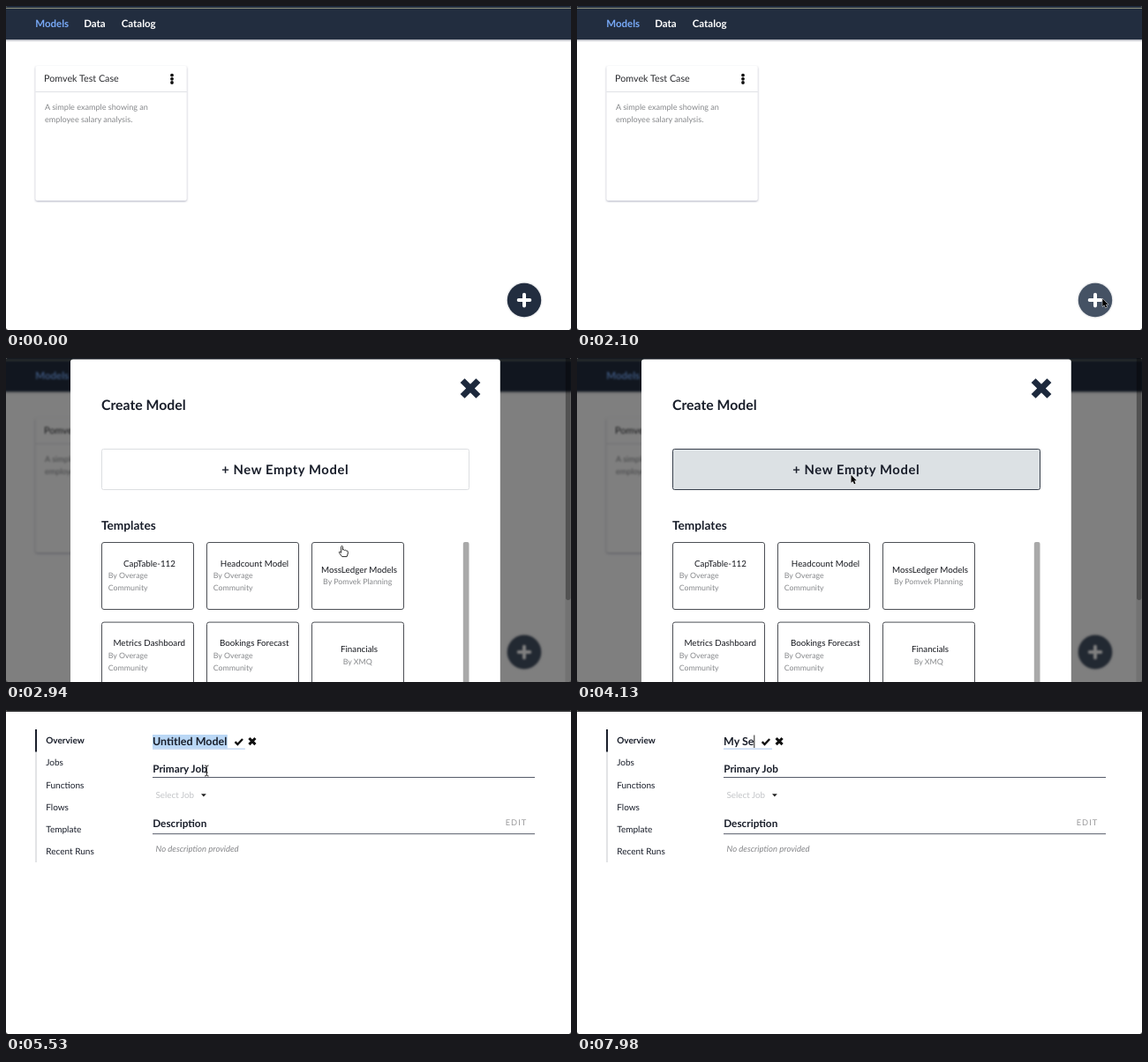
An HTML page that plays this animation: 640x368 px, repeating every 8000 ms.

```html
<!DOCTYPE html>
<html lang="en">
<head>
<meta charset="utf-8">
<title>Create a model</title>
<style>
  html, body { margin: 0; width: 100%; height: 100%; overflow: hidden; background: #fff; }
  svg { display: block; width: 100%; height: 100%; }
  text { font-family: Lato, "Open Sans", sans-serif; white-space: pre; text-rendering: geometricPrecision; }
</style>
</head>
<body>
<svg id="stage" viewBox="0 0 640 368" preserveAspectRatio="none"></svg>
<script>
const NS = "http://www.w3.org/2000/svg";
const LOOP = 8000, TICK = 70;
const NAVY = "#222d3f", INK = "#191e2a", GREY = "#86888b";
const stage = document.getElementById("stage");

// ---------- drawing helpers ----------
function add(parent, tag, attrs = {}, content) {
  const el = document.createElementNS(NS, tag);
  for (const key in attrs) el.setAttribute(key, attrs[key]);
  if (content !== undefined) el.textContent = content;
  parent.appendChild(el);
  return el;
}
const group = (parent, attrs) => add(parent, "g", attrs);
const path = (parent, d, attrs) => add(parent, "path", { d, ...attrs });
const rect = (parent, x, y, width, height, fill, attrs) =>
  add(parent, "rect", { x, y, width, height, fill, ...attrs });
const text = (parent, x, y, size, fill, content, attrs) =>
  add(parent, "text", { x, y, "font-size": size, fill, ...attrs }, content);
const bold = (parent, x, y, size, fill, content, attrs) =>
  text(parent, x, y, size, fill, content, { "font-weight": 700, ...attrs });
const show = (el, on) => el.setAttribute("visibility", on ? "visible" : "hidden");
const move = (el, x, y) => el.setAttribute("transform", `translate(${x} ${y})`);

// ---------- timing helpers ----------
const clamp = v => Math.min(1, Math.max(0, v));
const ramp = (t, from, to) => clamp((t - from) / (to - from));
const smooth = v => v * v * (3 - 2 * v);
const mix = (a, b, k) => a + (b - a) * k;
const blend = (a, b, k) => `rgb(${a.map((v, i) => Math.round(mix(v, b[i], k)))})`;

function along(keys, t) {
  let i = 0;
  while (i < keys.length - 2 && t >= keys[i + 1][0]) i++;
  const [t0, x0, y0] = keys[i], [t1, x1, y1] = keys[i + 1];
  const k = smooth(ramp(t, t0, t1));
  return [mix(x0, x1, k), mix(y0, y1, k)];
}

// ---------- model list ----------
rect(stage, 0, 0, 640, 368, "#fff");
const home = group(stage);
rect(home, -20, -20, 680, 408, "#fff");
const nav = rect(home, -20, -20, 680, 58, NAVY);
nav.style.filter = "drop-shadow(0 1px 1.3px rgba(25,35,60,.5))";
rect(home, -20, 2, 680, 1, "#8f917c");
bold(home, 33.2, 24.3, 11.5, "#78a9f7", "Models");
bold(home, 88.2, 24.3, 11.5, "#fff", "Data");
bold(home, 130.7, 24.3, 11.5, "#fff", "Catalog");

const card = rect(home, 33.3, 68, 171.5, 153, "#fff", { rx: 2 });
card.style.filter = "drop-shadow(0 1.2px .9px rgba(70,75,110,.42))";
rect(home, 33.3, 97, 171.5, 1, "#e0e1e6");
text(home, 43, 86.4, 10.75, "#2b2c30", "Pomvek Test Case");
for (const y of [78.6, 82.8, 87]) add(home, "circle", { cx: 188, cy: y, r: 1.9, fill: "#111" });
text(home, 44, 118.2, 9.1, GREY, "A simple example showing an");
text(home, 44, 131.6, 9.1, GREY, "employee salary analysis.");

const fab = add(home, "circle", { cx: 587, cy: 334, r: 19.2 });
fab.style.filter = "drop-shadow(0 0 1px rgba(30,40,60,.35))";
path(home, "M587 327.8V340.4M580.7 334.1H593.3",
  { stroke: "#fff", "stroke-width": 4, "stroke-linecap": "round" });

// ---------- create dialog ----------
const dialog = group(stage);
rect(dialog, 0, 0, 640, 368, "#000", { opacity: .5 });
rect(dialog, 633.5, 0, 6.5, 368, "#000", { opacity: .1 });
rect(dialog, 634, -6, 5.5, 281, "#000", { rx: 2.7, opacity: .28 });
rect(dialog, 73, 1.4, 486.8, 380, "#fff", { rx: 3 });
bold(dialog, 108, 58.5, 15.8, INK, "Create Model");
path(dialog, "M517.1 25.6L534.9 43.4M534.9 25.6L517.1 43.4", { stroke: "#1c283c", "stroke-width": 7 });
const emptyButton = rect(dialog, 108.5, 103.5, 416, 46, "#fff", { rx: 2 });
bold(dialog, 244.2, 132.2, 14.8, INK, "+ New Empty Model", { "letter-spacing": .58 });
bold(dialog, 108, 194.7, 13.7, INK, "Templates");
rect(dialog, 517.8, 209, 6.7, 180, "#a9a9a9", { rx: 2 });

function template(x, y, title, author, titleX) {
  rect(dialog, x + .5, y + .5, 104, 76, "#fff", { rx: 2.5, stroke: "#4c4f55" });
  const middle = { "text-anchor": "middle" };
  const single = author.length === 1;
  text(dialog, titleX, y + (single ? 34.7 : 27.6), 9.8, "#17191f", title, middle);
  if (single) text(dialog, x + 52.2, y + 48.1, 8.8, GREY, author[0], middle);
  else author.forEach((line, i) => text(dialog, x + 7.8, y + 41 + 14 * i, 8.8, GREY, line));
}
const community = ["By Overage", "Community"];
template(108, 209, "CapTable-112", community, 162.5);
template(227, 209, "Headcount Model", community, 281.5);
template(346, 209, "MossLedger Models", ["By Pomvek Planning"], 400);
template(108, 299.6, "Metrics Dashboard", community, 162.2);
template(227, 299.6, "Bookings Forecast", community, 281.2);
template(346, 299.6, "Financials", ["By XMQ"], 400);

// ---------- model overview ----------
const blank = rect(stage, 0, 0, 640, 368, "#fff");
const overview = group(stage);
rect(overview, 0, 0, 640, 2, "#2a2b2d");
rect(overview, 33.4, 22, 1.2, 151, "#d0d2d6");
rect(overview, 33, 22, 2, 25.5, INK);
["Overview", "Jobs", "Functions", "Flows", "Template", "Recent Runs"].forEach((label, i) =>
  text(overview, 45.2, 38.4 + 25.05 * i, 10.05, INK, label, { "font-weight": i ? 400 : 700 }));

function heading(y, label, ruleY) {
  bold(overview, 166.2, y, 11.8, INK, label);
  rect(overview, 166, ruleY, 433, 1, "#555a68");
}
heading(71, "Primary Job", 76);
text(overview, 169.5, 100, 9.85, "#c3c5c8", "Select Job");
path(overview, "M221 95.2H226.8L223.9 98.4Z", { fill: "#222" });
heading(133, "Description", 140.2);
text(overview, 565.8, 131.4, 9.3, "#9a9a9c", "EDIT", { "letter-spacing": .95 });
text(overview, 169.5, 160.8, 9.55, "#858689", "No description provided", { "font-style": "italic" });

const selection = rect(overview, 166, 28, 10, 15.5, "#bad7f5");
const underline = rect(overview, 166, 43.6, 10, 1, "#a9c6ec");
const title = bold(overview, 166, 40.2, 12.5, INK, "");
const caret = rect(overview, 0, 28.5, 1, 14.5, "#222");
const icons = group(overview);
path(icons, "M9.2 36.2L12 39L17.7 33", { fill: "none", stroke: "#111", "stroke-width": 2.4 });
path(icons, "M25.1 32L32.1 39.2M32.1 32L25.1 39.2", { stroke: "#111", "stroke-width": 3.1 });

// window corners
path(stage, "M0 366L2 368H0ZM640 366L638 368H640ZM0 1.5L1.5 0H0ZM640 1.5L638.5 0H640Z", { fill: "#555" });

// ---------- pointers ----------
const outline = { stroke: "#fff", "stroke-width": .9, "paint-order": "stroke", "stroke-linejoin": "round" };
const arrow = path(stage, "M0 0V9L2 7.2L3.5 10.5L5 9.8L3.7 6.6H6.3Z", { fill: "#000", ...outline });
const hand = path(stage,
  "M-.9 .8Q-.9 -.3 0 -.3T1 .8V4.2Q2.3 3.4 3 4.6Q4.3 4 5 5.1Q6.6 4.8 6.8 6.4V8.2L5.6 11.8H.2" +
  "L-3 7.7Q-3.7 6.5 -2.6 6.1L-.9 7.4Z",
  { fill: "#fff", stroke: "#222", "stroke-width": .95, "stroke-linejoin": "round" });
const beam = path(stage, "M-2.2 -6Q0 -6 0 -4.5Q0 -6 2.2 -6M0 -4.8V4.8M-2.2 6Q0 6 0 4.5Q0 6 2.2 6M-1.4 2H1.4",
  { fill: "none", stroke: "#222", "stroke-width": 1 });

const route = [
  [1260, 614.5, 334], [1400, 614.5, 334], [1890, 595.3, 332.3],
  [2590, 595.3, 332.3], [2940, 380.5, 213.8], [3430, 320, 150],
  [3710, 311.5, 134], [3850, 311.5, 134], [3990, 310.5, 132.7],
  [5040, 310.5, 132.7], [5530, 227.3, 69]
];
const typed = [[0, "Untitled Model"], [6300, "M"], [6790, "My"], [7210, "My "], [7560, "My S"], [7980, "My Se"]];

function drawPointer(t) {
  const [x, y] = along(route, t);
  const visible = t >= 1260 && t < 6300;
  const onCard = t < 4200 && x > 346 && x < 451 && y > 209 && y < 286;
  const onText = t > 5100 && x < 232;
  show(arrow, visible && !onCard && !onText);
  show(hand, visible && onCard);
  show(beam, visible && onText);
  for (const el of [arrow, hand, beam]) move(el, x, y);
}

function drawTitle(t) {
  const value = typed.filter(step => t >= step[0]).pop()[1];
  if (title.textContent !== value) title.textContent = value;
  const width = title.getComputedTextLength();
  const selected = t < 6300, open = t >= 4340;
  selection.setAttribute("width", width + .5);
  underline.setAttribute("width", width + 20.5);
  caret.setAttribute("x", 165.8 + width);
  move(icons, 166 + width, 0);
  show(selection, open && selected);
  show(caret, open && !selected);
}

function draw(ms) {
  const t = Math.floor(ms / TICK) * TICK;
  const modal = ramp(t, 2100, 2240);
  const hover = ramp(t, 1470, 1750);
  const lit = ramp(t, 3360, 3640);

  fab.setAttribute("fill", blend([34, 45, 63], [69, 82, 100], hover));
  home.style.filter = modal ? `blur(${1.3 * modal}px)` : "none";
  show(home, t < 4200);
  show(dialog, t >= 2170 && t < 4200);
  dialog.setAttribute("opacity", modal);
  emptyButton.setAttribute("fill", blend([255, 255, 255], [220, 225, 228], lit));
  emptyButton.setAttribute("stroke", blend([220, 222, 225], [54, 62, 74], lit));
  show(blank, t >= 4200);
  show(overview, t >= 4340);
  drawTitle(t);
  drawPointer(t);
}

const start = performance.now();
function frame() {
  draw((performance.now() - start) % LOOP);
  requestAnimationFrame(frame);
}
frame();
</script>
</body>
</html>
```
